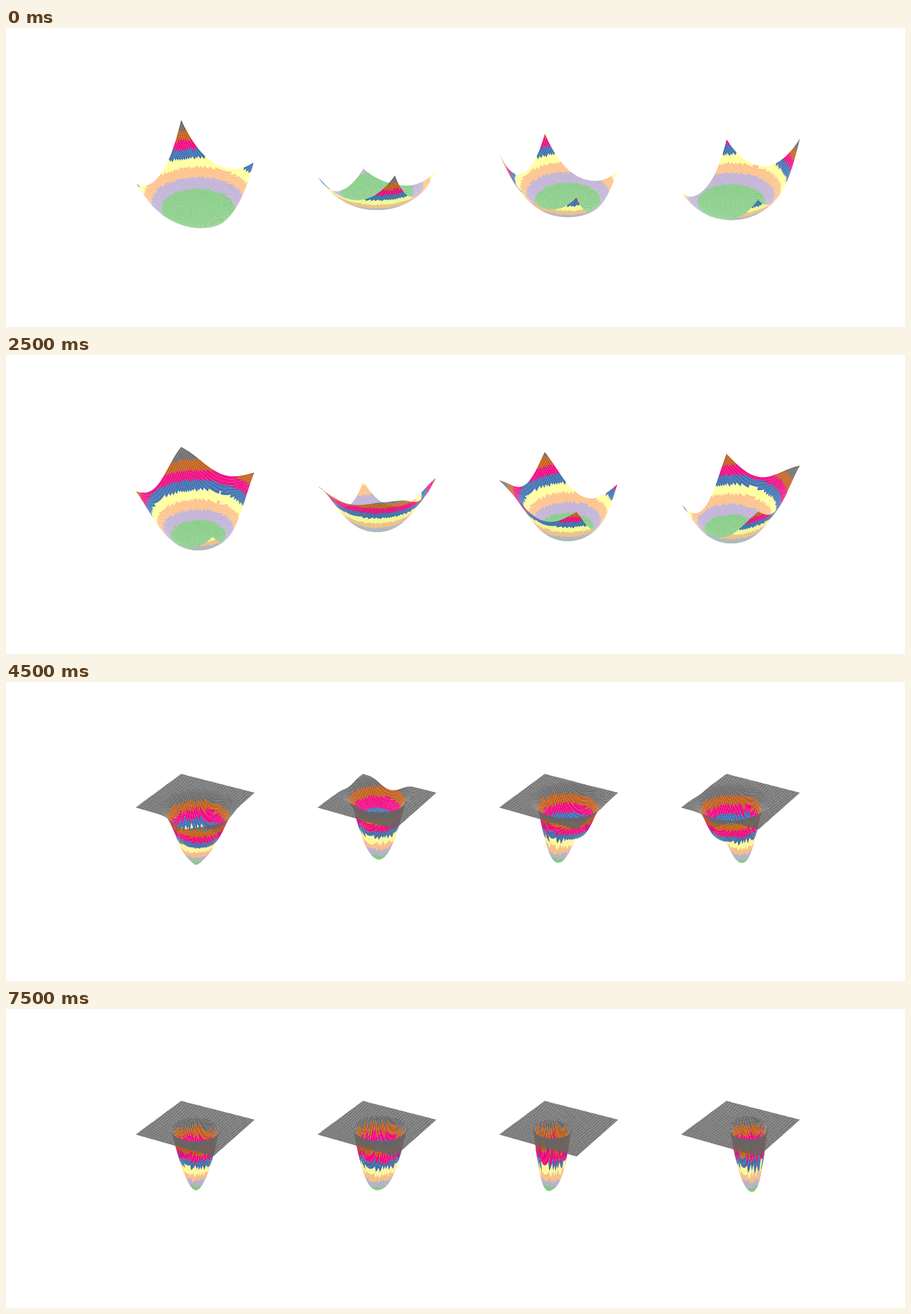
Recreate the animation shown at these times as an HTML page with a canvas. Size 1280 px wide and 427 px high, loop 8 s.

```html
<!DOCTYPE html>
<html lang="en">
<head>
<meta charset="utf-8">
<title>Four surfaces</title>
<style>
html, body { margin: 0; width: 100%; height: 100%; overflow: hidden; background: #fff; }
canvas { display: block; width: 1280px; height: 427px; }
</style>
</head>
<body>
<canvas id="c" width="1280" height="427"></canvas>
<script>
const ctx = document.getElementById('c').getContext('2d');
const LOOP = 8000, STEP = 500;
const N = 50;                       // cells per side
const HALF = 0.5195, TOP = 0.4286;  // half sizes of the box
const SCALE = 1165.7, DIST = 10, X0 = 270.7, Y0 = 212.7, GAP = 258.8;
const COS = Math.cos(Math.PI / 6), SIN = 0.5;
const ACCENT = ['#7fc97f', '#beaed4', '#fdc086', '#ffff99',
                '#386cb0', '#f0027f', '#bf5b17', '#666666'];

// basin: centre (x, y) of the first, wide shape; turn: seconds until half of it is gone
// well: centre (u, q) of the last, sharp-rimmed shape, with u to the right and q away
const PANELS = [
  { basin: [0.227, -0.294], turn: 4.6, well: [-0.02, -0.1], radius: 0.55, power: 1.8, long: 1, lean: [0.08, 0] },
  { basin: [-0.235, 0.354], turn: 4.3, well: [0.05, -0.05], radius: 0.61, power: 2.5, long: 1, lean: [-0.12, 0] },
  { basin: [0.16, 0.105], turn: 4.6, well: [-0.167, -0.1], radius: 0.43, power: 3, long: 1, lean: [-0.2, 0] },
  { basin: [-0.165, -0.19], turn: 4.6, well: [0.163, -0.02], radius: 0.43, power: 3, long: 1.3, lean: [0.35, -0.35] }
];

const turnU = (x, y) => COS * x + SIN * y;
const turnQ = (x, y) => -SIN * x + COS * y;
const mix = (a, b, k) => a + (b - a) * k;
const fall = (t, mid, power) => 1 / (1 + Math.pow(t / mid, power));

function heights({ basin, turn, well, radius, power, long, lean }, t) {
  const share = fall(t, turn, 10.6);
  const wide = 0.55 + 3.5 * fall(t, 1.68, 3.6);
  const steep = 3 + 4 * Math.pow(t / 5.5, 3.5);
  const sharp = power * (1 - 0.6 * share);
  const swing = Math.cos(Math.PI * (t - 7.5) / 2);
  const cu = mix(well[0], turnU(...basin), share * share);
  const cq = mix(well[1], turnQ(...basin), share * share);
  const out = [];
  for (let j = 0; j <= N; j++) {
    for (let i = 0; i <= N; i++) {
      const x = 2 * i / N - 1, y = 2 * j / N - 1;
      const d = Math.hypot(x - basin[0], y - basin[1]) / wide;
      const u = (turnU(x, y) - cu) / radius;
      const q = (turnQ(x, y) - cq) / (radius * long);
      const soft = Math.exp(-Math.pow(d, steep));
      const hard = Math.max(0, 1 - Math.pow(Math.hypot(u, q), sharp));
      const tilt = 1 + swing * (lean[0] * u + lean[1] * q);
      out.push(1 - share * soft - (1 - share) * hard * tilt);
    }
  }
  const lo = Math.min(...out), hi = Math.max(...out);
  return out.map(h => (h - lo) / (hi - lo));
}

function project(i, j, h, left) {
  const x = (2 * i / N - 1) * HALF, y = (2 * j / N - 1) * HALF, z = (2 * h - 1) * TOP;
  const q = turnQ(x, y);
  const near = SIN * z - COS * q;
  const k = SCALE / (DIST - near);
  return { x: left + turnU(x, y) * k, y: Y0 - (SIN * q + COS * z) * k, near, h };
}

function drawPanel(panel, left, t) {
  const W = N + 1;
  const pts = heights(panel, t).map((h, k) => project(k % W, Math.floor(k / W), h, left));
  const cells = [];
  for (let j = 0; j < N; j++) {
    for (let i = 0; i < N; i++) {
      const k = j * W + i;
      const quad = [pts[k], pts[k + 1], pts[k + W + 1], pts[k + W]];
      const mean = key => quad.reduce((s, v) => s + v[key], 0) / 4;
      cells.push({ quad, near: mean('near'), h: mean('h') });
    }
  }
  const lo = Math.min(...cells.map(c => c.h)), hi = Math.max(...cells.map(c => c.h));
  cells.sort((a, b) => a.near - b.near);
  for (const { quad, h } of cells) {
    ctx.fillStyle = ACCENT[Math.min(7, Math.floor((h - lo) / (hi - lo) * 8))];
    ctx.beginPath();
    for (const v of quad) ctx.lineTo(v.x, v.y);
    ctx.fill();
  }
}

let shown = -1;
function tick() {
  const step = Math.floor(performance.now() % LOOP / STEP);
  if (step !== shown) {
    shown = step;
    ctx.fillStyle = '#fff';
    ctx.fillRect(0, 0, 1280, 427);
    PANELS.forEach((p, i) => drawPanel(p, X0 + GAP * i, step * STEP / 1000));
  }
  requestAnimationFrame(tick);
}
tick();
</script>
</body>
</html>
```
